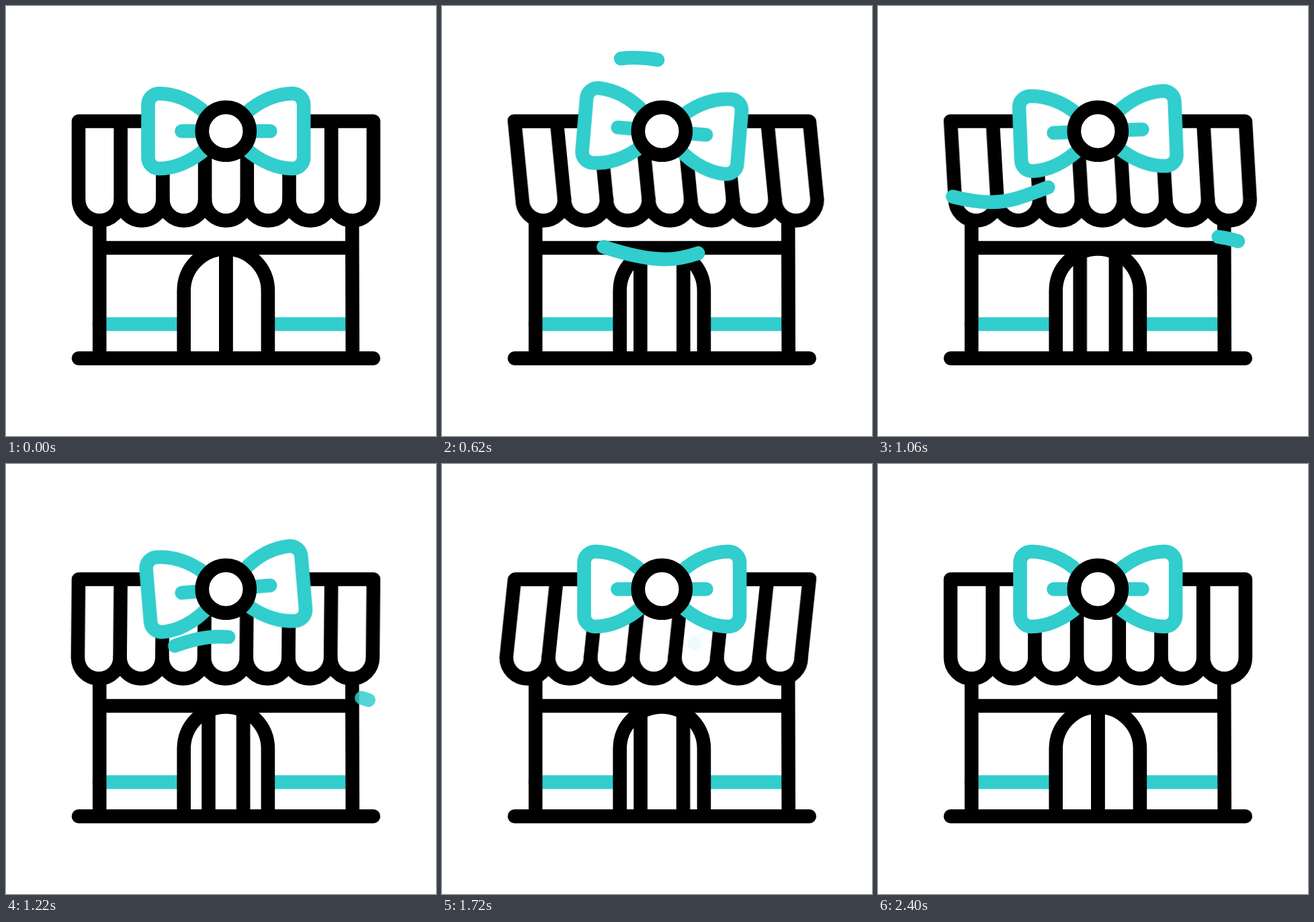
Write an HTML page without scripts that moves like this. It is 640 px wide and 640 px high and loops after 2.42 s.

```html
<!DOCTYPE html>
<html lang="en">
<head>
<meta charset="utf-8">
<title>Gift shop</title>
<style>
  html, body { margin: 0; width: 100%; height: 100%; overflow: hidden; background: #fff; }
  svg { display: block; width: 100%; height: 100%; }
  svg * { animation: 2420ms infinite cubic-bezier(.37, 0, .63, 1); }

  .ink, .teal { fill: none; stroke-width: 20.6; stroke-linejoin: round; }
  .ink { stroke: #000; }
  .teal { stroke: #32cdcd; stroke-linecap: round; }
  .filled { fill: #fff; }

  .drape { transform-origin: 0 171.5px; animation-name: skew; }
  .scallops { animation-name: sway; }
  .door { animation-name: slide; }
  .door.left { --open: -32px; --ajar: -25.8px; }
  .door.right { --open: 32px; --ajar: 25.8px; }
  .bow { transform-origin: 327.3px 186.3px; animation-name: tilt; }
  .wind { opacity: 0; animation-name: blow, fade; animation-timing-function: linear; animation-delay: var(--delay, 0s); }

  @keyframes skew {
    0%, 99.17%, 100% { transform: skewX(0deg); }
    33.06% { transform: skewX(6.37deg); }
    66.12% { transform: skewX(-6.37deg); }
  }
  @keyframes sway {
    0%, 99.17%, 100% { transform: translateX(0); }
    33.06% { transform: translateX(13px); }
    66.12% { transform: translateX(-13px); }
  }
  @keyframes slide {
    0%, 99.17%, 100% { transform: translateX(0); }
    24.79%, 74.38% { transform: translateX(var(--open)); }
    49.59% { transform: translateX(var(--ajar)); }
  }
  @keyframes tilt {
    0%, 70.25%, 100% { transform: rotate(0deg); }
    20.66%, 33.06% { transform: rotate(4.8deg); }
    49.59% { transform: rotate(-4.8deg); }
  }
  /* dash length = visible part, dash offset = tail position */
  @keyframes blow {
    0% { stroke-dasharray: .001 2; stroke-dashoffset: 0; }
    4.1% { stroke-dasharray: .09 2; stroke-dashoffset: 0; }
    9.1% { stroke-dasharray: .3 2; stroke-dashoffset: 0; }
    11.6% { stroke-dasharray: .4 2; stroke-dashoffset: -.03; }
    14.9% { stroke-dasharray: .46 2; stroke-dashoffset: -.13; }
    18.6% { stroke-dasharray: .36 2; stroke-dashoffset: -.38; }
    22.3% { stroke-dasharray: .245 2; stroke-dashoffset: -.615; }
    24.8% { stroke-dasharray: .18 2; stroke-dashoffset: -.735; }
    28.9% { stroke-dasharray: .105 2; stroke-dashoffset: -.86; }
    33% { stroke-dasharray: .08 2; stroke-dashoffset: -.92; }
    37.2% { stroke-dasharray: .04 2; stroke-dashoffset: -.958; }
    41.3%, 100% { stroke-dasharray: .001 2; stroke-dashoffset: -.999; }
  }
  @keyframes fade {
    0%, .4% { opacity: 0; }
    .41%, 37% { opacity: 1; }
    43.6%, 100% { opacity: 0; }
  }
</style>
</head>
<body>
<svg viewBox="0 0 640 640">
  <defs>
    <path id="loop" d="M298 160C276 140 250 130.2 228 130.2a16.5 16.5 0 0 0-16.5 16.5V225.5a16.5 16.5 0 0 0 16.5 16.5C250 242 276 232 298 212"/>
    <path id="gust" pathLength="1" d="M20 85C50 95 95 112 137 112C190 112 228 77 285 77C310 77 330 81 345 86.5"/>
  </defs>

  <path class="teal" d="M138.8 473.5H264M390 473.5H515"/>

  <g class="ink">
    <path d="M139.2 319V524M515.2 319L515.8 524M139 360H515"/>
    <path d="M264.7 524V424a62.6 62.6 0 0 1 125.2 0V524"/>
    <path class="door left" d="M327.3 366V524"/>
    <path class="door right" d="M327.3 366V524"/>
    <path stroke-linecap="round" d="M108 524.4H546.8"/>
  </g>

  <g class="ink">
    <path class="drape" d="M108 288.5V171.5H546.9V288.5M170.7 171.5v117M233.4 171.5v117M296.1 171.5v117M358.8 171.5v117M421.5 171.5v117M484.2 171.5v117"/>
    <path class="scallops" d="M108 288a31.35 31.35 0 0 0 62.7 0a31.35 31.35 0 0 0 62.7 0a31.35 31.35 0 0 0 62.7 0a31.35 31.35 0 0 0 62.7 0a31.35 31.35 0 0 0 62.7 0a31.35 31.35 0 0 0 62.7 0a31.35 31.35 0 0 0 62.7 0"/>
  </g>

  <g class="bow">
    <g class="teal filled">
      <use href="#loop"/>
      <use href="#loop" transform="matrix(-1 0 0 1 654.6 0)"/>
      <path d="M261.4 186.3H393.4"/>
    </g>
  </g>
  <circle class="ink filled" cx="327.3" cy="186.3" r="35.5"/>

  <g class="teal">
    <use class="wind" href="#gust"/>
    <use class="wind" href="#gust" x="31.5" y="180" style="--delay: 680ms"/>
    <use class="wind" href="#gust" x="195" y="265" style="--delay: 300ms"/>
  </g>
</svg>
</body>
</html>
```
